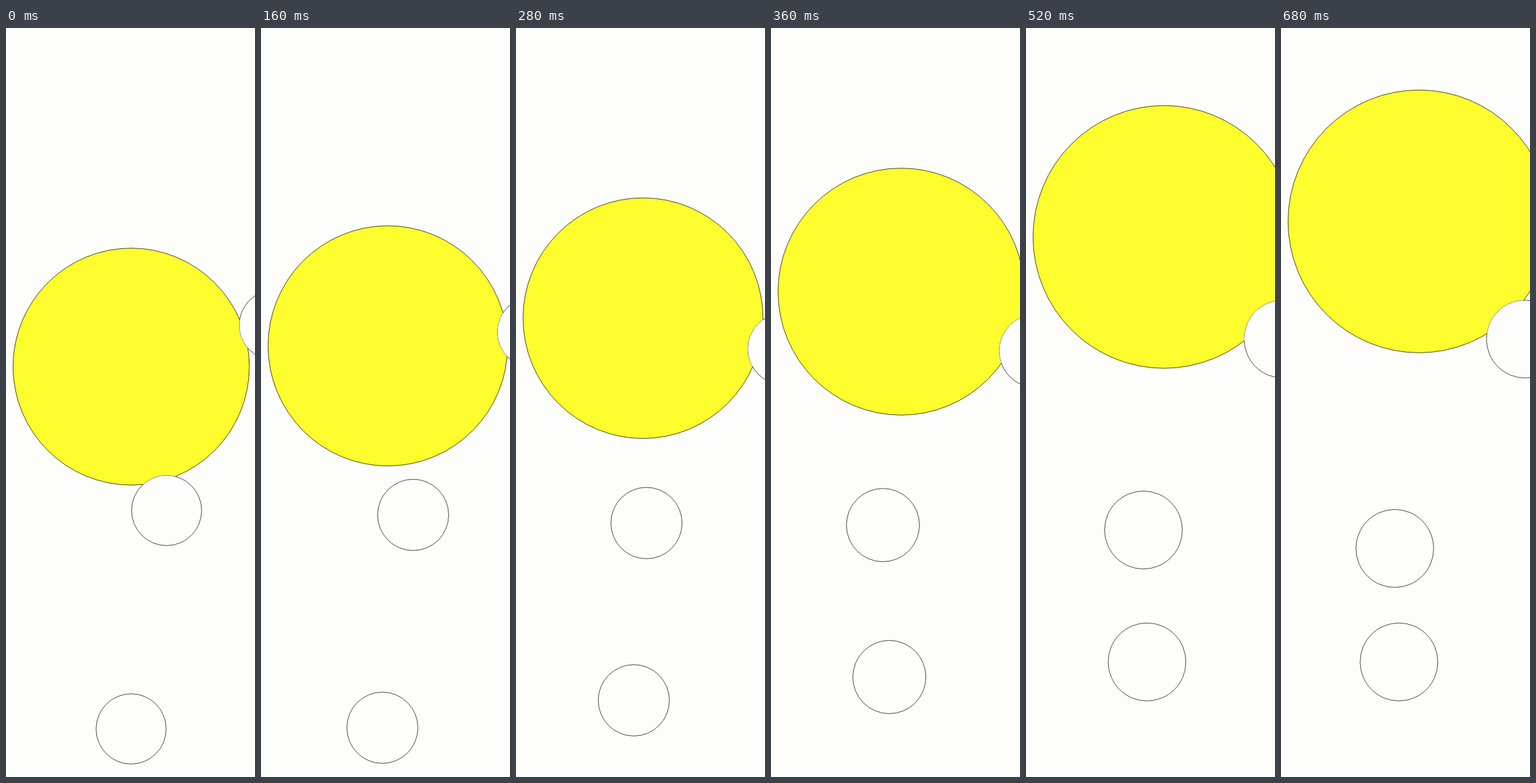
Animation of 400 by 1200 pixels, one loop 0.72 s. Source, as an HTML page with a canvas:

```html
<!DOCTYPE html>
<html lang="en">
<head>
<meta charset="utf-8">
<title>Circles</title>
<style>
  html, body { margin: 0; width: 100%; height: 100%; overflow: hidden; background: #fdfdfc; }
  canvas { display: block; width: 100%; height: 100%; }
</style>
</head>
<body>
<canvas id="stage" width="400" height="1200"></canvas>
<script>
const ctx = document.getElementById('stage').getContext('2d');
const LOOP = 720, STEP = 40, END = 680;
const PAPER = '#fdfdfc', SUN = '#fdfc2c', INK = '#111', PALE = '#e4e4dc';
const SUN_R = 189.8, SMALL_R = 56.3;
const PIVOT = { x: 11.3, y: 1080 }; // fixed point of the zoom

const progress = (t, from, to) => Math.min(1, Math.max(0, (t - from) / (to - from)));
const smooth = p => p * p * (3 - 2 * p);
const easeIn = (p, power = 2) => p ** power;
const easeOut = (p, power = 1.5) => 1 - (1 - p) ** power;

// A slow swell, then a quick push in
const zoomAt = t => 1 + 0.0155 * smooth(progress(t, 0, 200)) +
  0.0935 * smooth(progress(t, 300, 470));

// Positions before the zoom is applied
const sunAt = t => ({
  x: PIVOT.x + SUN_R,
  y: 542.5 - 157 * easeOut(progress(t, 95, END)),
  r: SUN_R
});

const bubblesAt = t => [
  {
    x: 431 - 76 * smooth(progress(t, 180, END)),
    y: 476 + 79.5 * smooth(progress(t, 0, 500))
  },
  {
    x: 258 - 85 * easeIn(progress(t, 0, 360)) - 7 * easeIn(progress(t, 360, END)),
    y: 773 + 85 * easeIn(progress(t, 0, END), 1.4)
  },
  {
    x: 201 - 29 * easeOut(progress(t, 0, END), 1.3),
    y: 1123 - 101 * smooth(progress(t, 130, 450))
  }
];

const zoomed = ({ x, y, r = SMALL_R }, z) => ({
  x: PIVOT.x + (x - PIVOT.x) * z,
  y: PIVOT.y + (y - PIVOT.y) * z,
  r: r * z
});

function trace(c) {
  ctx.beginPath();
  ctx.arc(c.x, c.y, c.r, 0, Math.PI * 2);
}

function outline(c, color) {
  trace(c);
  ctx.strokeStyle = color;
  ctx.stroke();
}

function disc(c, fill) {
  trace(c);
  ctx.fillStyle = fill;
  ctx.fill();
  outline(c, INK);
}

// Small circles lose their dark outline where they cover the sun
function bubble(c, sun) {
  disc(c, PAPER);
  ctx.save();
  trace(sun);
  ctx.clip();
  outline(c, PALE);
  ctx.restore();
}

function draw(t) {
  const z = zoomAt(t);
  const sun = zoomed(sunAt(t), z);
  ctx.fillStyle = PAPER;
  ctx.fillRect(0, 0, 400, 1200);
  ctx.lineWidth = 0.8;
  disc(sun, SUN);
  for (const b of bubblesAt(t)) bubble(zoomed(b, z), sun);
}

const start = performance.now();
function tick() {
  const t = (performance.now() - start) % LOOP;
  draw(Math.floor(t / STEP) * STEP);
  requestAnimationFrame(tick);
}
tick();
</script>
</body>
</html>
```
